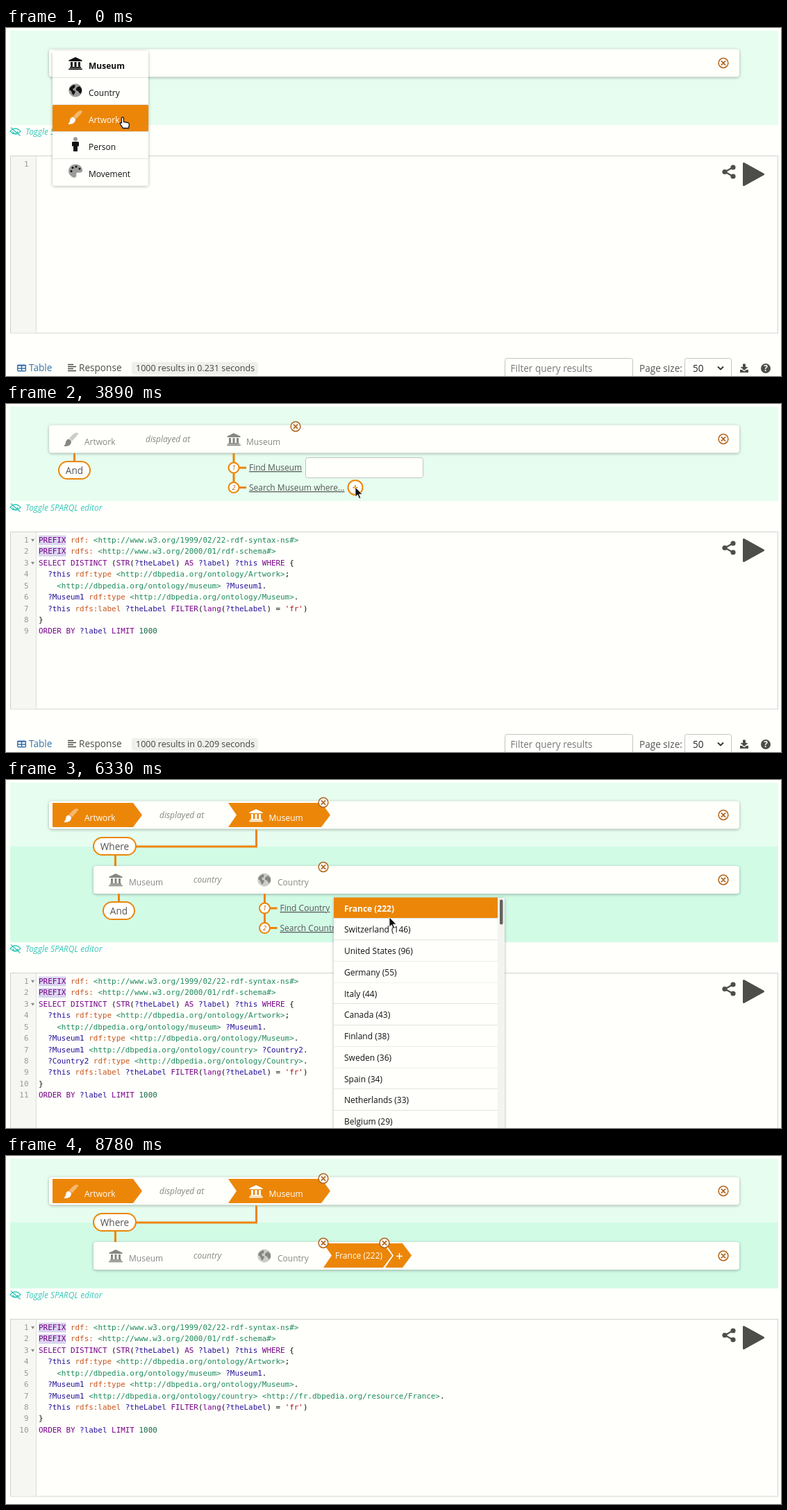
These frames come from a looping animation (1116 by 502 pixels, 9330 ms). An HTML page:

```html
<!DOCTYPE html>
<html lang="en">
<head>
<meta charset="utf-8">
<title>Visual query builder</title>
<style>
  html, body { margin: 0; width: 100%; height: 100%; overflow: hidden; background: #fffffb; }
  svg { display: block; width: 1116px; height: 502px; }
  text { font-family: "Open Sans", sans-serif; font-size: 12px; fill: currentColor; white-space: pre; }
  .ui { font-size: 13.6px; }
  .code text, .num { font-family: "DejaVu Sans Mono", monospace; font-size: 10.91px; }
  .num { fill: #999; text-anchor: end; }
  .i { font-style: italic; }
  .b { font-weight: 700; }
  .u { text-decoration: underline; }
  .mid { text-anchor: middle; }
  .paper { fill: #fffffc; }
  .card { fill: #fffffc; filter: drop-shadow(0 1px 2px rgba(0, 0, 0, .3)); }
  .line { fill: none; stroke: #ec8608; stroke-width: 3; }
  .pill { fill: #fffffc; stroke: #ec8608; stroke-width: 2; }
  .chevron { fill: #ec8608; }
  .box { fill: #fffffc; stroke: #c4c4c0; }
  .item { color: #111; }
  .item rect { fill: #fffffc; }
  .item.hot { color: #fff; }
  .item.hot rect { fill: #ec8608; }
  .rule { stroke: #e2e2de; }
  .icon { fill: currentColor; }
  .dim { opacity: .42; }
  .kw { color: #770088; } .var { color: #221199; } .uri { color: #1c8a58; }
  .pre { color: #c8541c; } .num-lit { color: #116644; } .str { color: #aa1111; } .op { color: #111; }
</style>
</head>
<body>
<svg id="stage" viewBox="0 0 1116 502"></svg>
<script>
const LOOP = 9330, STEP = 11.111;
const GRAY = '#868683', DARK = '#4d4d49';

const icons = {
  museum: '<path d="M-9.5-4.5 0-9 9.5-4.5V-3h-19zM-7-2h3v7h-3zM-1.5-2h3v7h-3zM4-2h3v7H4zM-8 5.3H8V7H-8zM-9.8 7.5H9.8v1.7H-9.8z"/>',
  globe: '<circle r="9.7" class="dim"/><path d="M-8-4-3-8 0-7-1-4-4-2-3 0 0 1-1 4-3 7-5 4-6 1-9-1zM3-5 6-6 9-2 9 2 7 5 5 3 4 1 1 0 1-3z"/>',
  brush: '<path class="dim" d="M6-9.5q3-1 4 1 0 2-9 11l-4-4q6-7 9-8z"/><path d="M-4-.5q4 1 4 4.5-1 6-9 6-2 0-1-1.5 2-1 2-4 .5-4 4-5z"/>',
  person: '<circle cy="-7.5" r="3" class="dim"/><path d="M-4-3.8h8q1 0 1 1.5v5H3v7.5h-6V2.7h-2v-5q0-1.5 1-1.5z"/>',
  palette: '<path class="dim" d="M0-10C6-10 10-6 10-1 10 3 6 2 3 2 0 2 2 5 1 8 0 10-4 9.5-6 7.5-9 5-10 2-10 0-10-6-5-10 0-10z"/>' +
    '<circle cx="-6" r="1.5"/><circle cx="-4" cy="-5" r="1.5"/><circle cx="1" cy="-6.5" r="1.5"/><circle cx="6" cy="-3.5" r="1.5"/>',
  search: '<circle cx="-2" cy="-2" r="6.5" class="dim" fill="none" stroke="currentColor" stroke-width="2.8"/><path d="M3 3 8.5 8.5" stroke="currentColor" stroke-width="3.6" stroke-linecap="round"/>'
};

// Markup helpers
const text = (x, y, s, cls = '', color = '') =>
  `<text x="${x}" y="${y}" class="${cls}"${color && ` style="color:${color}"`}>${s.replace(/</g, '&lt;')}</text>`;
const rect = (x, y, w, h, attr = '') => `<rect x="${x}" y="${y}" width="${w}" height="${h}" ${attr}/>`;
const path = (d, attr) => `<path d="${d}" ${attr}/>`;
const icon = (name, x, y, color = 'currentColor') =>
  `<g class="icon" transform="translate(${x} ${y})" style="color:${color}">${icons[name]}</g>`;
const during = (from, to, body) => `<g data-from="${from}" data-to="${to}">${body}</g>`;

const closer = (x, y) => `<circle cx="${x}" cy="${y}" r="6.9" class="paper" stroke="#b0651c" stroke-width="1.5"/>` +
  path(`M${x - 2.6} ${y - 2.6}l5.2 5.2m0-5.2l-5.2 5.2`, 'stroke="#b0651c" stroke-width="1.8" stroke-linecap="round"');
const bar = (x, y) => rect(x, y, 1056 - x, 40, 'rx="4" class="card"') + closer(1033, y + 20);
const node = (name, label, x, y, color = GRAY, gap = 19) =>
  icon(name, x, y, color) + text(x + gap, y + 8, label, '', color);
const pill = (x, y, w, label) =>
  rect(x, y, w, 25, 'rx="12.5" class="pill"') + text(x + w / 2, y + 17.5, label, 'ui mid', '#555');
const hot = (x, y, w, h, body, cls = 'item') =>
  `<g class="${cls}" data-hot="${x},${y},${w},${h}">${body}</g>`;

function menu(x, y, w, items) {
  const h = 38.9, cx = x + 33, tx = x + 52;
  return rect(x, y, w, h * items.length, 'rx="4" class="card"') + items.map(([name, label], i) => {
    const top = y + i * h;
    return hot(x, top, w, h, rect(x, top, w, h, 'rx="2"') + icon(name, cx, top + 18) +
      text(tx, top + 26, label, i ? '' : 'b')) +
      (i ? path(`M${x} ${Math.round(top) - .5}h${w}`, 'class="rule"') : '');
  }).join('');
}

function options(x, y, label, len) {
  const step = n => `<circle cx="${x}" cy="${y + 21 + (n - 1) * 28.5}" r="7.5" class="pill"/>` +
    `<text x="${x}" y="${y + 24.3 + (n - 1) * 28.5}" class="i mid" style="font-size:9px;color:#b0651c">${n}</text>`;
  return path(`M${x} ${y}v50M${x} ${y + 21}h18M${x} ${y + 49.5}h18`, 'class="line"') + step(1) + step(2) +
    text(x + 22, y + 25, 'Find ' + label, 'u', '#555') +
    text(x + 22, y + 54, `Search ${label} where...`, 'u', '#555') +
    `<circle cx="${x + len}" cy="${y + 49.5}" r="10.5" class="pill"/>` +
    path(`M${x + len - 3.5} ${y + 49.5}h7m-3.5-3.5v7`, 'stroke="#d27a10" stroke-width="1.4"');
}

// Query editor text
const SYNTAX = /(<[^>]*>)|(\?\w+)|('\w+')|(\b(?:PREFIX|SELECT|DISTINCT|STR|AS|WHERE|FILTER|lang|ORDER|BY|LIMIT)\b)|(rdfs?:\w*)|(\d+)|([^\s\w])/g;
const KINDS = ['uri', 'var', 'str', 'kw', 'pre', 'num-lit', 'op'];
const ONTO = 'http://dbpedia.org/ontology/';
const CH = 6.568, ROW = 16.42;

function code(lines) {
  let n = 0;
  return '<g class="code">' + lines.map((raw, i) => {
    const y = 200 + i * ROW, wrapped = raw[0] === '~', line = raw.replace('~', '');
    const words = [...line.matchAll(SYNTAX)].map(m => {
      const x = 47 + m.index * CH;
      const mark = m[0] === 'PREFIX' ? rect(x, y - 10.5, CH * 6, 14, 'fill="#d9d4ee"') : '';
      return mark + text(x.toFixed(2), y, m[0], KINDS[m.slice(1).findIndex(Boolean)]);
    });
    return (wrapped ? '' : text(32.5, y, String(++n), 'num')) + words.join('');
  }).join('') + '</g>';
}
const head = ['PREFIX rdf: <http://www.w3.org/1999/02/22-rdf-syntax-ns#>', 'PREFIX rdfs: <http://www.w3.org/2000/01/rdf-schema#>'];
const select = 'SELECT DISTINCT (STR(?theLabel) AS ?label) ?this WHERE {';
const filter = "FILTER(lang(?theLabel) = 'fr')";
const tail = ['}', 'ORDER BY ?label LIMIT 1000'];
const query = (...extra) => code([...head, select,
  `  ?this rdf:type <${ONTO}Artwork>;`, `    <${ONTO}museum> ?Museum1.`, `  ?Museum1 rdf:type <${ONTO}Museum>.`,
  ...extra, `  ?this rdfs:label ?theLabel ${filter}`, ...tail]);
const folds = [0, 2].map(i => path(`M36 ${194.8 + i * ROW}h5l-2.5 4z`, 'fill="#8a8a86"')).join('');
const foldSpans = [[1110, 2670], [2890, 4000], [4330, 5220], [5440, 7220], [8110, LOOP]];
const busySpans = [[670, 1670], [2670, 3450], [4000, 4560], [5220, 5670], [7220, 7440]];
const timing = (from, to, s) => during(from, to, text(187, 495, `1000 results in ${s} seconds`, '" style="font-size:12.5px;color:#444'));

const editor = '<g id="editor">' +
  path('M6 149q7.500-8 15 0-7.500 8-15 0zM10 149a3.500 3.500 0 0 0 7 0', 'fill="none" stroke="#39c8ba" stroke-width="1.4"') +
  path('M7 143.500l13.500 12', 'stroke="#39c8ba" stroke-width="1.6"') +
  text(28, 153.5, 'Toggle SPARQL editor', 'i', '#39c8ba') +
  rect(6.5, 184.5, 1105, 255.5, 'class="paper" stroke="#d2d2ce"') +
  rect(7, 185, 36, 254.5, 'fill="#f6f6f3"') + path('M43.500 185v254.500', 'stroke="#dcdcd8"') +
  during(0, 560, text(32.5, 200, '1', 'num')) +
  during(560, 2670, code([...head, `${select} ?this rdf:type <${ONTO}Artwork>.   ?this rdfs:label ?theLabel`, '~' + filter, ...tail])) +
  during(2670, 4000, query()) +
  during(4000, 5220, query('')) +
  during(5220, 7220, query(`  ?Museum1 <${ONTO}country> ?Country2.`, `  ?Country2 rdf:type <${ONTO}Country>.`)) +
  during(7220, LOOP, query(`  ?Museum1 <${ONTO}country> <http://fr.dbpedia.org/resource/France>.`)) +
  foldSpans.map(([a, b]) => during(a, b, folds)).join('') +
  path('M1047 201l-12 6.500 12 6.500', `fill="none" stroke="${DARK}" stroke-width="2.2"`) +
  [[1047, 201], [1035, 207.5], [1047, 214]].map(([x, y]) => `<circle cx="${x}" cy="${y}" r="3.6" fill="${DARK}"/>`).join('') +
  path('M1062.500 195.500v31l28-15.500z', `fill="${DARK}" stroke="${DARK}" stroke-width="3" stroke-linejoin="round"`) +
  busySpans.map(([a, b]) => during(a, b, path('M1062 195l25 14', 'class="busy" stroke="#a6a6a0" stroke-width="2" stroke-dasharray="10 8"'))).join('') +
  rect(16.7, 486.2, 11.6, 8.6, 'rx="1" fill="none" stroke="#3673ad" stroke-width="1.5"') +
  path('M16.500 487h12M16.500 491h12M22.500 486v9', 'stroke="#3673ad" stroke-width="1.6"') +
  text(33, 495, 'Table', 'ui', '#3673ad') +
  path('M89 485.500h8m-8 3h12m-12 3h8m-8 3h12', 'stroke="#4b4b48" stroke-width="1.5"') +
  text(105, 495, 'Response', 'ui', '#4b4b48') +
  rect(181, 482, 182, 18, 'rx="4" fill="#efefec"') +
  timing(0, 1780, '0.231') + timing(1780, 3450, '0.249') + timing(3450, LOOP, '0.209') +
  rect(718.5, 476.5, 184, 29, 'rx="3" class="box"') + text(726.5, 495.5, 'Filter query results', 'ui', '#777') +
  text(912, 495.5, 'Page size:', 'ui', '#555') +
  rect(977.5, 476.5, 67, 29, 'rx="3" class="box"') + text(989, 495.5, '50', 'ui', '#222') +
  path('M1025 488.500l4 4 4-4', 'fill="none" stroke="#333" stroke-width="1.8"') +
  path('M1061 484.500h4v4.500h3.500l-5.500 5-5.500-5h3.500zM1057 493h3l3 2.500 3-2.500h3v4h-12z', `fill="${DARK}"`) +
  `<circle cx="1094" cy="491" r="7" fill="${DARK}"/>` + text(1094, 495, '?', 'b mid', '#fff') +
  '</g>';

const countries = ['France (222)', 'Switzerland (146)', 'United States (96)', 'Germany (55)', 'Italy (44)', 'Canada (43)',
  'Finland (38)', 'Sweden (36)', 'Spain (34)', 'Netherlands (33)', 'Belgium (29)'];
const list = rect(472, 170, 246, 345, 'class="card"') + countries.map((name, i) => {
  const y = 169.5 + i * 30.75;
  return hot(472, y, 236, 30.75, rect(472, y, 236, 30.3) + text(487, y + 20, name, i ? '' : 'b'), 'item list') +
    path(`M472 ${Math.round(y + 30.75) - .5}h236`, 'class="rule"');
}).join('') + rect(708, 170, 10, 345, 'fill="#f3f3f0"') + rect(711, 172.5, 4.5, 36, 'rx="2" fill="#62625e"');

const chevron = (x1, x2, y, notch = 12, tip = 13) =>
  path(`M${x1} ${y}H${x2 - tip}l${tip} 17.500-${tip} 17.500H${x1}l${notch}-17.500z`, 'class="chevron"');

const stage = document.getElementById('stage');
stage.innerHTML =
  rect(0, 0, 1116, 502, 'fill="#fffffb"') +
  rect(6, 4, 1106, 136, 'fill="#e6fdef"') +
  during(4000, 7220, rect(6, 96, 1106, 138, 'fill="#d2fbe6"')) +
  during(7220, LOOP, rect(6, 96, 1106, 95, 'fill="#d2fbe6"')) +
  editor +
  bar(62, 30.5) +
  during(0, 440, menu(67, 33, 138, [['museum', 'Museum'], ['globe', 'Country'], ['brush', 'Artwork'], ['person', 'Person'], ['palette', 'Movement']])) +
  during(440, 4000, node('brush', 'Artwork', 94, 51)) +
  during(440, 2560, menu(261, 33, 129, [['museum', 'Museum'], ['person', 'Person'], ['search', 'Search']])) +
  during(2560, 4000,
    text(201, 54.5, 'displayed at', 'i', GRAY) + node('museum', 'Museum', 328, 51, GRAY, 18) + closer(417, 32.5) +
    path('M98.500 71v13', 'class="line"') + pill(76, 83, 45, 'And') +
    options(328, 71, 'Museum', 175) + rect(431.5, 77.5, 169, 29, 'rx="3" class="box"')) +
  during(4000, LOOP,
    chevron(67, 196, 33, 0) + chevron(320, 467, 33) +
    node('brush', 'Artwork', 94, 51, '#fff') + text(221, 54.5, 'displayed at', 'i', GRAY) +
    node('museum', 'Museum', 360, 51, '#fff', 18.5) + closer(457, 32.5) +
    path('M360.500 71.500V96H187M157.500 108v16', 'class="line"') + pill(126, 83, 61, 'Where') +
    bar(126, 124) + node('museum', 'Museum', 158, 144)) +
  during(4000, 5110, menu(329.5, 126, 125, [['globe', 'Country'], ['brush', 'Artwork'], ['search', 'Search']])) +
  during(5110, LOOP, text(270, 147.5, 'country', 'i', GRAY) + node('globe', 'Country', 372, 144)) +
  during(5110, 7220,
    path('M162.500 164v13', 'class="line"') + pill(140, 176, 45, 'And') + options(372.5, 164, 'Country', 170.5) +
    rect(471, 170, 104, 29, 'rx="3" class="paper"') + text(480, 188.5, 'France (222)', '', '#555') +
    path('M559 182.500l3.500 3.500 3.500-3.500', 'fill="none" stroke="#777" stroke-width="1.500"')) +
  during(5110, 6110, hot(471, 170, 104, 29, '', 'hit')) +
  during(7220, LOOP, chevron(457, 556, 126) + text(474, 147.5, 'France (222)', '', '#fff') +
    chevron(546, 584, 126) + path('M562 144.500h9m-4.500-4.500v9', 'stroke="#fff" stroke-width="1.400"') + closer(545, 125.5)) +
  during(5110, LOOP, closer(457, 125.5)) +
  during(6110, 7220, `<g id="list">${list}</g>`) +
  '<g id="cursor">' +
  path('M-1.500 1.500q0-1.800 1.500-1.800t1.500 1.800v5l6 1.200q2 .5 2 2.300l-1 5.500h-8l-4-6q-.7-1.300.5-1.800 1-.3 1.500.8z', 'id="hand" fill="#fff" stroke="#111" stroke-width="1.300"') +
  path('M0 0v14l3.300-3 2.400 5.500 2.200-1-2.400-5.300h4.500z', 'id="arrow" fill="#111" stroke="#fff" stroke-width=".8"') + '</g>';

// Pointer way points: time, x, y
const route = [[0, 168, 129], [110, 168, 129], [220, 166, 128], [1110, 166, 128], [2000, 262, 66], [2440, 320, 50], [2560, 320, 50],
  [2670, 320, 53], [2890, 322, 56], [3670, 498, 119], [3890, 503, 120], [4330, 503, 120], [4890, 421, 150], [5220, 421, 150],
  [5780, 561, 181], [6110, 561, 181], [6440, 548, 206], [6670, 552, 204], [6890, 557, 181], [7890, 557, 181],
  [8220, 88, 135], [8330, 88, 135], [8560, 24, -1], [LOOP, 24, -1]];

function pointer(t) {
  const i = Math.max(1, route.findIndex(p => p[0] >= t));
  const [a, b] = [route[i - 1], route[i]], f = (t - a[0]) / (b[0] - a[0]);
  return [1, 2].map(k => Math.round(a[k] + (b[k] - a[k]) * f));
}

const $ = id => document.getElementById(id);
const timed = [...stage.querySelectorAll('[data-from]')].map(el => ({ el, from: +el.dataset.from, to: +el.dataset.to }));
const hots = [...stage.querySelectorAll('[data-hot]')].map(el => ({ el, box: el.dataset.hot.split(',').map(Number), host: el.closest('[data-from]') }));
const busy = stage.querySelectorAll('.busy');
let last = -1;

function render(now) {
  const k = Math.floor(((now % LOOP) / 10 + .5) / STEP);
  if (k === last) return;
  last = k;
  const t = Math.min(LOOP - 1, Math.round(k * STEP) * 10);
  for (const { el, from, to } of timed) el.style.display = t >= from && t < to ? '' : 'none';

  $('editor').setAttribute('transform', `translate(0 ${t < 4000 ? 0 : t < 7220 ? 94 : 51})`);
  busy.forEach(el => el.setAttribute('stroke-dashoffset', -k * 7));

  const open = Math.min(1, Math.max(0, (t - 6050) / 200)), s = .75 + .25 * open;
  $('list').setAttribute('transform', `translate(${595 * (1 - s)} ${170 * (1 - s) - 21 * (1 - open)}) scale(${s})`);
  $('list').setAttribute('opacity', open);

  const [x, y] = pointer(t);
  let hand = false;
  for (const { el, box: [bx, by, w, h], host } of hots) {
    const on = host.style.display !== 'none' && x >= bx && x < bx + w && y >= by && y < by + h;
    el.classList.toggle('hot', on);
    if (on && !el.classList.contains('list')) hand = true;
  }
  $('cursor').setAttribute('transform', `translate(${x} ${y})`);
  $('cursor').style.display = t < 8780 ? '' : 'none';
  $('hand').style.display = hand ? '' : 'none';
  $('arrow').style.display = hand ? 'none' : '';
}

const start = performance.now();
function tick() {
  render(performance.now() - start);
  requestAnimationFrame(tick);
}
tick();
</script>
</body>
</html>
```
